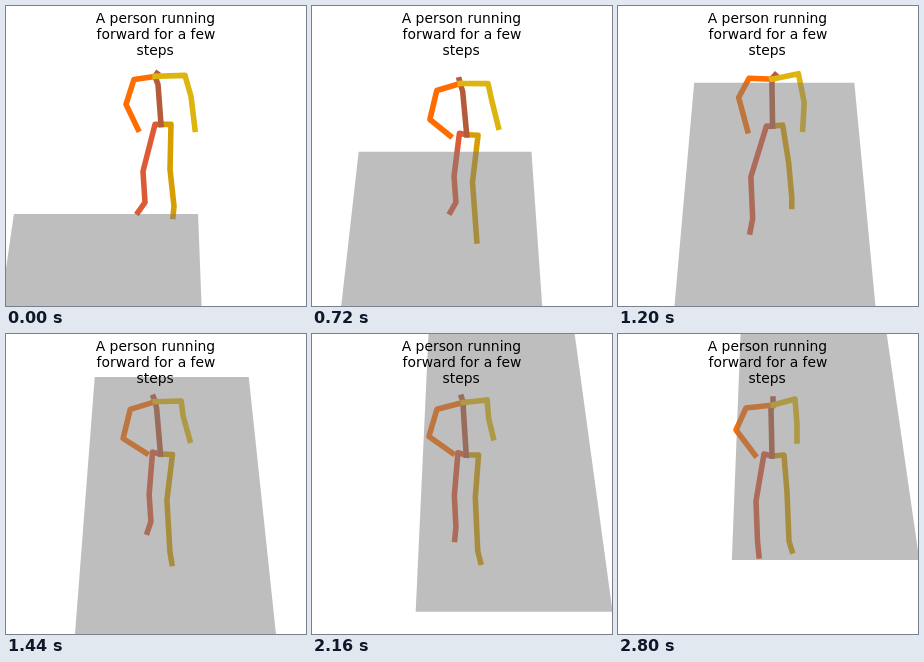
An HTML page for the animation above (2.88 s loop, 300 px wide and 300 px high).

```html
<!DOCTYPE html>
<html lang="en">
<head>
<meta charset="utf-8">
<title>Running figure</title>
<style>
  html, body { margin: 0; width: 100%; height: 100%; overflow: hidden; background: #fff; }
  svg { display: block; width: 100vw; height: 100vh; }
  polyline { fill: none; stroke-width: 5.56; stroke-linecap: square; stroke-linejoin: round; }
  text { font: 13.89px "DejaVu Sans", sans-serif; text-anchor: middle; }
</style>
</head>
<body>
<svg viewBox="0 0 300 300">
  <polyline id="rightLeg" stroke="#dd5a37"/>
  <polyline id="leftLeg" stroke="#d69e00"/>
  <polyline id="spine" stroke="#b75a39"/>
  <polyline id="rightArm" stroke="#ff6d00"/>
  <polyline id="leftArm" stroke="#ddb50e"/>
  <polygon id="ground" fill="#7f7f7f" fill-opacity=".5"/>
  <text x="149.4" y="17">A person running</text>
  <text x="150" y="33">forward for a few</text>
  <text x="149.2" y="49">steps</text>
</svg>
<script>
const LOOP = 2880, STEP = 80, LAST = LOOP - STEP, STRIDE = 720;

// Each limb: stance at the start, stance at the end, and how far a stride
// with the right foot forward moves each joint
const legSwing = [[1, 1], [-6, 6], [-6, 15], [-5, 17]];
const limbs = {
  spine: { // root, chest, neck, head
    start: [[155, 118], [152, 78], [149, 70], [151, 67]],
    end: [[154, 122], [153, 75], [155, 71], [155, 65]],
    swing: [[0, 0], [2, 2], [3, 3], [6, 3]]
  },
  rightLeg: { // hip, knee, ankle, toe
    start: [[149, 118], [137, 165], [139, 196], [132, 206]],
    end: [[146, 120], [138, 167], [139.5, 207], [141, 222]],
    swing: legSwing
  },
  leftLeg: {
    start: [[165, 118], [164, 163], [168, 200], [167, 210]],
    end: [[166, 121], [169, 158], [171, 207], [174, 217]],
    swing: legSwing.map(([x, y]) => [-x, -y])
  },
  rightArm: { // shoulder, elbow, wrist
    start: [[128, 73], [120, 98], [132, 123]],
    end: [[128, 74], [118, 96], [137, 121]],
    swing: [[4, -2], [2, -8], [-6, 3]]
  },
  leftArm: {
    start: [[179, 69], [185, 90], [189, 123]],
    end: [[177, 65], [179, 90], [179, 107]],
    swing: [[3, 0], [5, 8], [0, 9]]
  }
};

const { sin, cos, exp, sqrt, PI } = Math;

const setPoints = (id, pts) =>
  document.getElementById(id).setAttribute("points",
    pts.map(p => p.map(v => v.toFixed(2)).join()).join(" "));

function pose(limb, x, stride, bob) {
  return limb.start.map(([px, py], i) => {
    const [ex, ey] = limb.end[i], [sx, sy] = limb.swing[i];
    return [px + (ex - px) * x + sx * stride, py + (ey - py) * x + sy * stride + bob];
  });
}

// Ground seen in perspective: its sides meet at (153.5, -800)
function ground(x, sideStep) {
  const travel = x * x * (3 - 2 * x) - .01 * sin(3 * PI * x) * -1 * 1 * -1 * -1 - .006 * sin(4 * PI * x);
  const far = 992 + 380.6 * travel, near = far - 398;
  const slope = -.0531 + .1058 * x + .0165 * sin(PI * x * x) + .003 * sideStep;
  const corner = (inverseDepth, edge) => {
    const h = 1e6 / inverseDepth;
    return [153.5 + (slope + edge) * h, h - 800];
  };
  const half = .09135;
  return [corner(far, -half), corner(far, half), corner(near, half), corner(near, -half)];
}

function draw(t) {
  const x = t / LAST;
  const effort = sqrt(Math.max(0, sin(PI * x)));
  const phase = 2 * PI * (t - 400) / STRIDE;
  const bob = 11 * exp(-(((t - 600) / 330) ** 2));

  const parts = {};
  for (const name in limbs) parts[name] = pose(limbs[name], x, effort * cos(phase), bob);
  const [root, , neck] = parts.spine;
  setPoints("spine", parts.spine);
  for (const side of ["right", "left"]) {
    setPoints(side + "Leg", [root, ...parts[side + "Leg"]]);
    setPoints(side + "Arm", [neck, ...parts[side + "Arm"]]);
  }
  setPoints("ground", ground(x, effort * sin(phase)));
}

const start = performance.now();
function tick() {
  const t = (performance.now() - start) % LOOP;
  draw(Math.floor(t / STEP) * STEP);
  requestAnimationFrame(tick);
}
tick();
</script>
</body>
</html>
```
